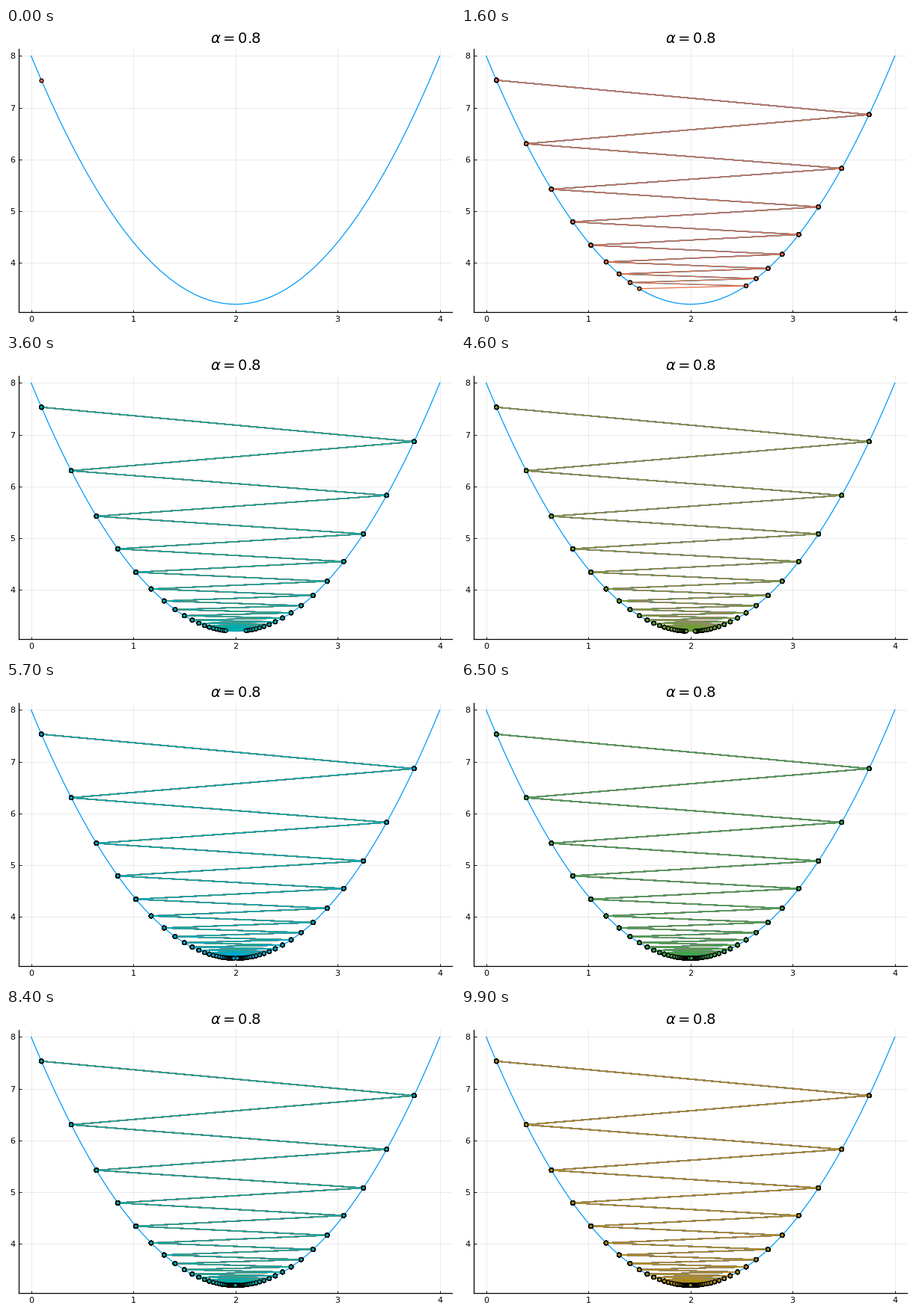
Write a matplotlib script that moves like this. It is 600 by 400 pixels and loops after 10 s.

```python
import numpy as np
import matplotlib.pyplot as plt
from matplotlib.animation import FuncAnimation
from matplotlib.collections import EllipseCollection

W, H, DPI = 600, 400, 100
PX = 72 / DPI  # one pixel in points
STEPS = 100
ALPHA = 0.8
LINE = 1.25 * PX
PALETTE = """#009AFA #E36F47 #3EA44E #C371D2 #AC8E18 #00AAAE #ED5E93 #C68225
#00A98D #8E971E #00A9CC #9B7FE9 #618DF6 #F06073 #DD65B6 #6C9F33""".split()

plt.rcParams.update({
    "font.family": "DejaVu Sans",
    "mathtext.fontset": "dejavusans",
    "path.simplify": False,
})


def cost(x):
    return 1.2 * (x - 2) ** 2 + 3.2


def slope(x):
    return 2.4 * (x - 2)


def descend(x, steps):
    xs = [x]
    for _ in range(steps - 1):
        xs.append(xs[-1] - ALPHA * slope(xs[-1]))
    return np.array(xs)


def make_axes(fig, left, right, top, bottom):
    ax = fig.add_axes([left / W, 1 - bottom / H,
                       (right - left) / W, (bottom - top) / H])
    ax.set(xlim=(-0.12, 4.12), ylim=(3.056, 8.144),
           xticks=range(5), yticks=range(4, 9))
    ax.spines[["top", "right"]].set_visible(False)
    ax.spines[["left", "bottom"]].set_linewidth(LINE)
    ax.tick_params(direction="in", length=3.5 * PX, width=0.9 * PX, labelsize=8)
    ax.tick_params(axis="x", pad=5.6 * PX)
    ax.tick_params(axis="y", pad=5.2 * PX)
    ax.set_axisbelow(True)
    ax.grid(color="black", alpha=0.08, linewidth=PX)
    ax.set_title(rf"$\alpha = {ALPHA}$", fontsize=14, pad=7.6 * PX)
    return ax


def add_path(ax, xs, color):
    """One series: the zigzag so far with a ringed dot on every step."""
    ys = cost(xs)
    line, = ax.plot(xs, ys, color=color, lw=LINE, zorder=3)
    size = np.full(len(xs), 5.0)
    dots = EllipseCollection(
        size, size, np.zeros(len(xs)), units="dots",
        offsets=np.column_stack([xs, ys]), offset_transform=ax.transData,
        facecolors=color, edgecolors="black", linewidths=LINE, zorder=3)
    dots.set_snap(False)
    ax.add_collection(dots, autolim=False)
    return line, dots


fig = plt.figure(figsize=(W / DPI, H / DPI), dpi=DPI, facecolor="white")
ax = make_axes(fig, 17.3, 596.06, 27.5, 379.5)

x = np.linspace(0, 4, 201)
ax.plot(x, cost(x), color=PALETTE[0], lw=LINE, zorder=2.8)

walk = descend(0.1, STEPS)
series = [add_path(ax, walk[:i + 1], PALETTE[(i + 1) % len(PALETTE)])
          for i in range(STEPS)]


def update(frame):
    # Every step lays the whole path down again in the next colour.
    for i, artists in enumerate(series):
        for artist in artists:
            artist.set_visible(i <= frame)
    return []


anim = FuncAnimation(fig, update, frames=STEPS, init_func=lambda: update(0),
                     interval=100, repeat=True, repeat_delay=0, blit=False)
plt.show()
```
